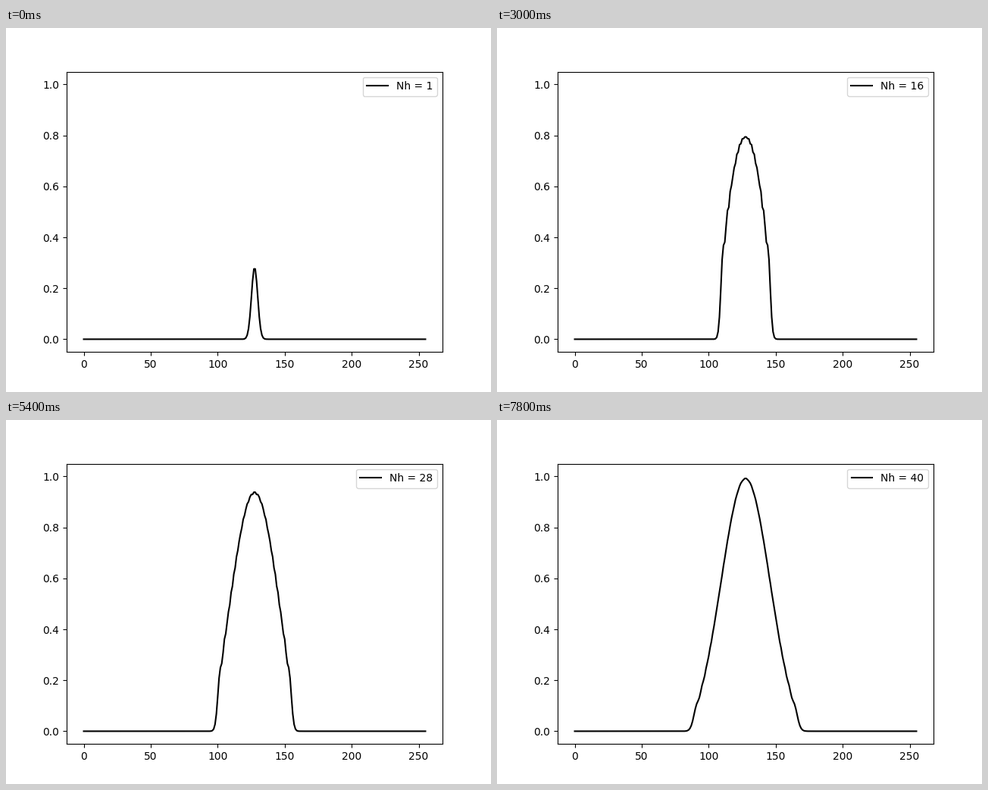
Write a matplotlib script that moves like this. It is 640 by 480 pixels and loops after 8000 ms.

```python
import numpy as np
import matplotlib.pyplot as plt
from matplotlib.animation import FuncAnimation

M = 256        # samples
H = 0.41       # semi-classical parameter, in samples
SIGMA = 18.03  # width of the Gaussian well, in samples
STEPS = 40

x = np.arange(M)
well = np.exp(-((x - (M - 1) / 2) / SIGMA) ** 2 / 2)


def partial_sums():
    """Running sums of 4 h kappa psi^2 over the bound states of -h^2 d2/dx2 - well."""
    k = 2 * np.pi * np.fft.fftfreq(M)
    kinetic = np.fft.ifft((k ** 2)[:, None] * np.fft.fft(np.eye(M), axis=0), axis=0).real
    energy, psi = np.linalg.eigh(H ** 2 * (kinetic + kinetic.T) / 2 - np.diag(well))
    kappa = np.sqrt(np.maximum(-energy[:STEPS], 0))
    return np.cumsum(4 * H * kappa * psi[:, :STEPS] ** 2, axis=1).T


curves = partial_sums()

fig, ax = plt.subplots(figsize=(6.4, 4.8), dpi=100)
ax.set_xlim(-12.75, 267.75)
ax.set_ylim(-0.05, 1.05)
line, = ax.plot(x, curves[0], color="black", lw=1.5, label="Nh = 1")
label = ax.legend(loc="upper right").get_texts()[0]


def draw(i):
    line.set_ydata(curves[i])
    label.set_text(f"Nh = {i + 1}")
    return line, label


anim = FuncAnimation(fig, draw, frames=STEPS, init_func=lambda: draw(0),
                     interval=200, repeat=True, repeat_delay=0, blit=False)
plt.show()
```
